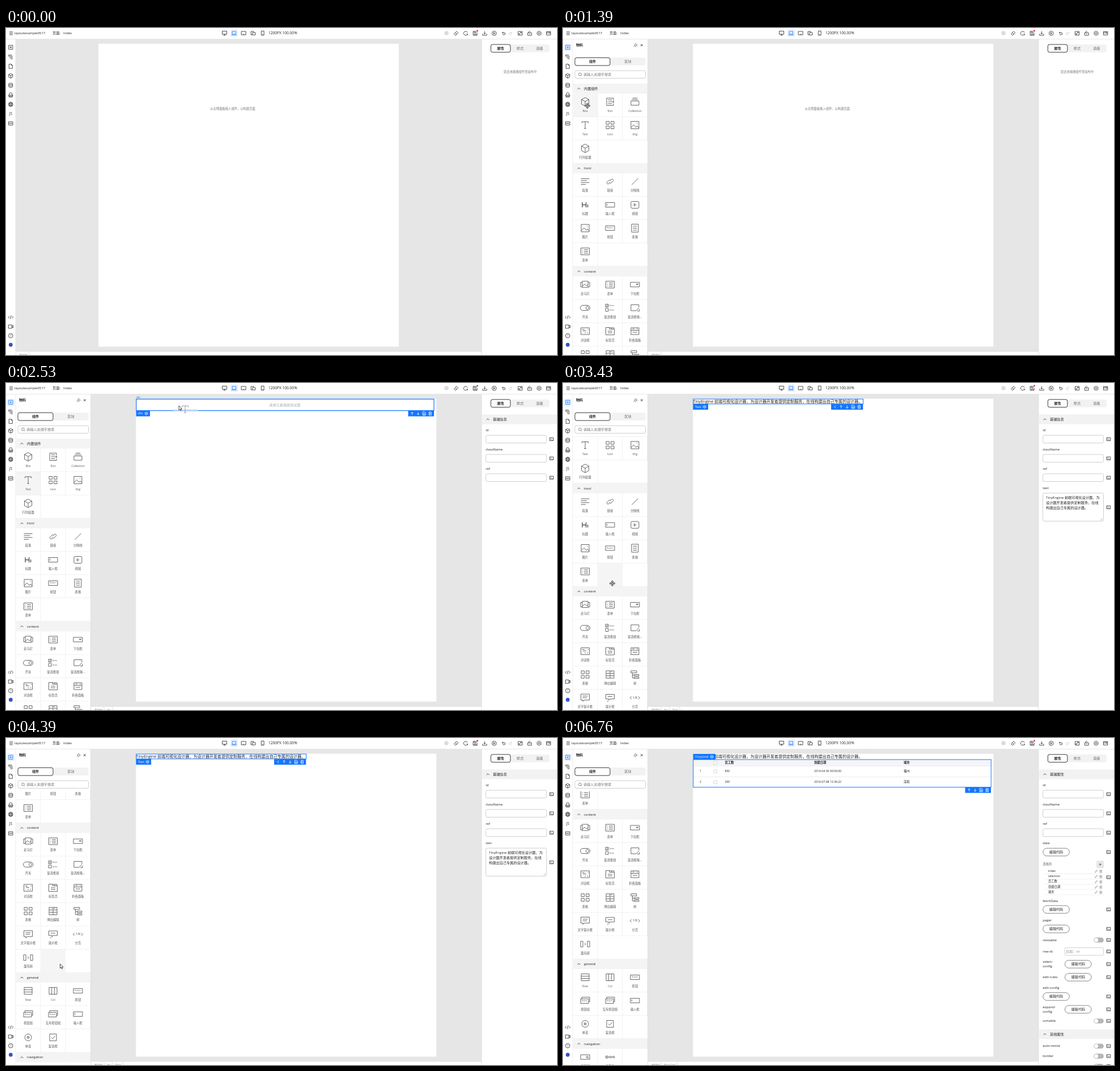
Write an HTML page with a canvas that moves like this. It is 972x576 px and loops after 6.79 s.

```html
<!DOCTYPE html>
<html lang="zh-CN">
<head>
<meta charset="utf-8">
<title>Page designer</title>
<style>
html, body { margin: 0; width: 100%; height: 100%; overflow: hidden; background: #fff; }
canvas { display: block; width: 972px; height: 576px; }
</style>
</head>
<body>
<canvas id="stage"></canvas>
<script>
const LOOP = 6790;
const BLUE = '#1476ff', INK = '#222', GREY = '#666';
const FONT = '"Open Sans","Noto Sans CJK SC","Noto Sans CJK",sans-serif';
const cv = document.getElementById('stage'), c = cv.getContext('2d');
const dpr = window.devicePixelRatio || 1;
cv.width = 972 * dpr;
cv.height = 576 * dpr;

// Icon outlines, centred on 0,0
const ICON = {
  box: 'M0-7.5L6.5-4V4L0 7.5L-6.5 4V-4ZM-6.5-4L0-.5L6.5-4M0-.5V7.5',
  slot: 'M6-2.5V-6.5H-6V6.5H6V3M-3.5-3.5H3.5M-3.5 0H7M-3.5 3.5H3.5M5-2L7 0L5 2',
  stack: 'M-7-1.5H7V6H-7ZM-5.5-4H5.5M-4-6.5H4',
  text: 'M-5.5-3.5V-6H5.5V-3.5M0-6V6M-2 6H2',
  four: 'M-7-6.5h5.5v5h-5.5zM1.5-6.5h5.5v5h-5.5zM-7 1.5h5.5v5h-5.5zM1.5 1.5h5.5v5h-5.5z',
  img: 'M-7-6.5H7V6.5H-7ZM-7 4.5L-2-.5L2 4L4 1.5L7 5M3-3.5h1.2',
  para: 'M-7.5-5H7.5M-7.5-1.7H3M-7.5 1.7H7.5M-7.5 5H1',
  link: 'M-1 2.2L-3.2 4.6A2.6 2.6 0 0 1-5.4 1L-2-2.2A2.6 2.6 0 0 1 1.6-1.8M1-2.2L3.2-4.6A2.6 2.6 0 0 1 5.4-1L2 2.2A2.6 2.6 0 0 1-1.6 1.8',
  line: 'M-5.5 5.5L5.5-5.5',
  head: 'M-5-4.5V4.5M1.5-4.5V4.5M-5 0H1.5M4.5 4.5V.5L3.5 1',
  input: 'M-8-4H8V4H-8ZM-5.5-2V1.5',
  video: 'M-5-6H5Q7-6 7-4V4Q7 6 5 6H-5Q-7 6-7 4V-4Q-7-6-5-6ZM-1.5-2.2L2 0L-1.5 2.2Z',
  btn: 'M-8-4H8V4H-8Z',
  doc: 'M-6-7H6V7H-6ZM-3.5-3.5H3.5M-3.5 0H3.5M-3.5 3.5H3.5',
  list: 'M-7.5-6H7.5V6H-7.5ZM-5-3H-4M-2-3H5M-5 0H-4M-2 0H5M-5 3H-4M-2 3H5',
  slide: 'M-5-6H5V5H-5ZM-5-4H-8V4H-5M5-4H8V4H5M-5 3L-1-1L2 2L5 0',
  select: 'M-8-4H8V4H-8ZM2-1L4 1L6-1Z',
  toggle: 'M-4-4.5H4A4.5 4.5 0 0 1 4 4.5H-4A4.5 4.5 0 0 1-4-4.5ZM1.5 0A2.3 2.3 0 1 0 6 0A2.3 2.3 0 1 0 1.5 0',
  checks: 'M-8-6.5h5v5h-5zM-8 1h5v5h-5zM-7-4L-5.7-2.8L-4-5.5',
  edit: 'M7-1V-5.5H-7V5H2M2 5L7 0M4 5.5H8V2',
  dialog: 'M-7.5-6H7.5V6H-7.5ZM-5.5-3H-1M4.5-3H6M-4-.5H2M-1 3H1M3 3H5',
  tabs: 'M-7.5-6.5H-1V-3.5H7.5V6.5H-7.5ZM-1-6H3V-3.5M3-6H7V-3.5M-4 0H4M-4 3H4',
  fold: 'M-7-6H7V6H-7ZM-7-1.5H7M-4.5-4H-1M3-4H5M-4 2H4',
  popup: 'M-7-6.5H7V6.5H-7ZM-7-2H7M-7 2.2H7M0-2V6.5M-2-4L3-5',
  tree: 'M-7-6.5H3V-3H-7ZM-1 0H7V2.5H-1ZM-1 4.5H7V7H-1ZM-4.5-3V6H-1M-4.5 1H-1',
  tip: 'M-7.5-6.5H7.5V4H-2L-4 6.5V4H-7.5ZM-4.5-3H4.5M-4.5 0H3',
  pop: 'M-7.5-6H7.5V2H0L-2 4.5V2H-7.5ZM-4-2H4M-5 6H-3',
  pager: 'M-6-2.5L-8.5 0L-6 2.5M6-2.5L8.5 0L6 2.5',
  crumb: 'M-8-5H-4V5H-8ZM4-5H8V5H4ZM-1-2L1 0L-1 2',
  row: 'M-7-6H7V6H-7ZM-7-2H7M-7 2H7',
  col: 'M-7-6H7V6H-7ZM-2.3-6V6M2.3-6V6',
  btns: 'M-6-3V-6H8V2H6M-8-3H6V5H-8Z',
  radio: 'M-6 0A6 6 0 1 0 6 0A6 6 0 1 0-6 0M-2 0A2 2 0 1 0 2 0A2 2 0 1 0-2 0M-1 0H1',
  check: 'M-6-6H6V6H-6ZM-3 0L-.7 2.3L3.5-2.5',
  find: 'M-8-4H8V4H-8ZM2 0A1.6 1.6 0 1 0 5.2 0A1.6 1.6 0 1 0 2 0M4.8 1.2L6 2.4',
  steps: 'M-8 0A2.2 2.2 0 1 0-3.6 0A2.2 2.2 0 1 0-8 0M-3.6 0H-1M-1 0A1.6 1.6 0 1 0 2.2 0A1.6 1.6 0 1 0-1 0M2.2 0H4.8M4.8 0A1.6 1.6 0 1 0 8 0A1.6 1.6 0 1 0 4.8 0M-5.8-1V1',
  // small interface icons
  menu: 'M-3-2.5H3M-3 0H3M-3 2.5H3',
  desk: 'M-4-3.5H4V2H-4ZM0 2V3.7M-2 3.7H2',
  laptop: 'M-3.2-3H3.2V2H-3.2ZM-4.5 3.2H4.5',
  pad: 'M-4-3H4V3H-4ZM-1 2H1',
  fold2: 'M-3.7 3V-3H1V-1.5M-1-1H4V3.2H-1ZM-3.7 3H-1',
  phone: 'M-2.4-3.7H2.4V3.7H-2.4ZM-.6 2.5H.6',
  erase: 'M-3.6 1L1-3.5L3.7-.8L-.8 3.5H-1.5ZM-1.5-1L1.3 1.7',
  turn: 'M3.3-1.2A3.5 3.5 0 1 0 2.8 2.2M3.6 3.4V1.4H1.6',
  save: 'M2-3.4H-3.5V3.5H3.5V-1M-1.6-3.4V-.8H1.6V-3M-1.6 3.5V1.5H1.6V3.5',
  down: 'M0-3.5V1.5M-2-.5L0 1.5L2-.5M-3.7 1V3.5H3.7V1',
  play: 'M-3.8 0A3.8 3.8 0 1 0 3.8 0A3.8 3.8 0 1 0-3.8 0M-1-1.6L1.6 0L-1 1.6Z',
  undo: 'M-1-2.6L-2.7-1L-1 .6M-2.7-1H1A1.7 1.7 0 0 1 1 2.5H-2',
  redo: 'M1-2.6L2.7-1L1 .6M2.7-1H-1A1.7 1.7 0 0 0-1 2.5H2',
  media: 'M-3.6-3.2H3.6V3.2H-3.6ZM-2 1.7L2-1.7M.5-1.7H2V-.2M-2 .2V1.7H-.5',
  lock: 'M-3.4-.8H3.4V3.6H-3.4ZM-1.7-.8V-2A1.7 1.7 0 0 1 1.5-2.7M0 .8V2',
  gear: 'M0-3.8L3.4-1.9V1.9L0 3.8L-3.4 1.9V-1.9ZM-1.3 0A1.3 1.3 0 1 0 1.3 0A1.3 1.3 0 1 0-1.3 0',
  plate: 'M-3.7-3H3.7V3H-3.7Z',
  add: 'M-3.6-3.6H3.6V3.6H-3.6ZM-2 0H2M0-2V2',
  outline: 'M-3.5-3.2H2M-2-1H3.5M-2 1.2H3.5M-.5 3.4H3.5M-3.5-3.2V-1H-2',
  page: 'M-3-3.8H1L3-1.8V3.8H-3ZM1-3.8V-1.8H3',
  data: 'M-3.4-2.5A3.4 1.3 0 0 1 3.4-2.5V2.5A3.4 1.3 0 0 1-3.4 2.5ZM-3.4-2.5A3.4 1.3 0 0 0 3.4-2.5M-3.4 0A3.4 1.3 0 0 0 3.4 0',
  stamp: 'M-2.5.5V-2A2.5 1.8 0 0 1 2.5-2V.5M-3.7.5H3.7V2.4H-3.7ZM-3.5 3.8H3.5',
  globe: 'M-3.8 0A3.8 3.8 0 1 0 3.8 0A3.8 3.8 0 1 0-3.8 0M-1.7 0A1.7 3.8 0 1 0 1.7 0A1.7 3.8 0 1 0-1.7 0M-3.5-1.3H3.5M-3.5 1.3H3.5',
  code: 'M-2.2-2.2L-4.4 0L-2.2 2.2M2.2-2.2L4.4 0L2.2 2.2M.8-3L-.8 3',
  cam: 'M-4-3H2V3H-4ZM2-.8L4.3-2.2V2.2L2 .8',
  ring: 'M-3.8 0A3.8 3.8 0 1 0 3.8 0A3.8 3.8 0 1 0-3.8 0',
  pin: 'M0-3L3 0L1.5.3L.2 2.5L-2.5-.2L-.3-1.5ZM-1.2 1.2L-3 3',
  close: 'M-1.8-1.8L1.8 1.8M1.8-1.8L-1.8 1.8',
  lens: 'M-2.8-.4A2.4 2.4 0 1 0 2-.4A2.4 2.4 0 1 0-2.8-.4M1.4 1.4L3 3',
  up: 'M0-2.5V2.5M-2-.5L0-2.5L2-.5',
  dn: 'M0-2.5V2.5M-2 .5L0 2.5L2 .5',
  back: 'M1.2-2.4L-1.2 0L1.2 2.4',
  copy: 'M-2.5-3H1L2.5-1.5V3H-2.5ZM-1 2V0H1V2',
  bin: 'M-2.8-1.8H2.8M-2-1.8V2.8H2V-1.8M-1-3H1M-.6-.3V1.5M.6-.3V1.5',
  pen: 'M-2 2L-1.6.6L1.5-2.4L2.4-1.5L-.6 1.6Z',
  chev: 'M-2.4 1.2L0-1.2L2.4 1.2',
  plus: 'M-2 0H2M0-2V2',
  bind: 'M-3.3-2.6H3.3V2.6H-3.3ZM-1.8-1L-.6 0L-1.8 1M.2 1.2H1.8'
};
const PATH = {};
for (const k in ICON) PATH[k] = new Path2D(ICON[k]);

const GROUPS = [
  ['内置组件', 'box Box|slot Slot|stack Collection|text Text|four Icon|img Img|box 行列容器'],
  ['html', 'para 段落|link 链接|line 分隔线|head 标题|input 输入框|video 视频|img 图片|btn 按钮|doc 表格|list 表单'],
  ['content', 'slide 走马灯|list 表单|select 下拉框|toggle 开关|checks 复选框组|edit 复选框拖...|dialog 对话框|tabs 标签页|fold 折叠面板|four 表格|popup 弹出编辑|tree 树|tip 文字提示框|pop 提示框|pager 分页|crumb 面包屑'],
  ['general', 'row Row|col Col|btn 按钮|btns 按钮组|btns 互斥按钮组|input 输入框|radio 单选|check 复选框'],
  ['navigation', 'find 搜索框|steps 步骤条']
].map(([title, items]) => [title, items.split('|').map(s => s.split(' '))]);

// [time, x, y] of the pointer
const POINTER = [
  [100, 640, 135], [400, 300, 108], [760, 9, 36], [1090, 9, 36], [1390, 43, 137], [1510, 43, 137],
  [1750, 470, 108], [1780, 455, 110], [2080, 41, 173], [2170, 41, 173], [2440, 275, 58], [2530, 305, 40],
  [2710, 305, 40], [2770, 316, 40], [2980, 316, 40], [3340, 87, 353], [3670, 87, 353], [3970, 95.5, 398],
  [4390, 95.5, 398], [4570, 95.5, 385], [5440, 95.5, 385], [5470, 82, 323], [5710, 42, 276],
  [5860, 42, 276], [6160, 340, 122], [6400, 340, 122], [6700, 600, -12]
];
const SCROLL = [[3370, 0], [3430, 61], [3640, 170], [3970, 262], [4150, 262], [4180, 270], [4390, 270], [4570, 294]];
// start, drop, icon, grab point
const DRAGS = [[1510, 1750, 'box', 43, 137], [2170, 2980, 'text', 41, 173], [5860, 6400, 'four', 42, 276]];

function along(track, t) {
  if (t <= track[0][0]) return track[0].slice(1);
  for (let i = 1; i < track.length; i++) {
    const a = track[i - 1], b = track[i];
    if (t < b[0]) {
      const k = (t - a[0]) / (b[0] - a[0]);
      return a.slice(1).map((v, j) => v + (b[j + 1] - v) * k);
    }
  }
  return track[track.length - 1].slice(1);
}

function fill(x, y, w, h, color) {
  c.fillStyle = color;
  c.fillRect(x, y, w, h);
}
function round(x, y, w, h, r, bg, line, lw = .8) {
  c.beginPath();
  c.roundRect(x, y, w, h, r);
  if (bg) { c.fillStyle = bg; c.fill(); }
  if (line) { c.strokeStyle = line; c.lineWidth = lw; c.stroke(); }
}
function text(s, x, y, size = 6.18, color = INK, align = 'left', weight = 400) {
  if (/^[\x00-\x7f]+$/.test(s)) size *= .96;
  c.font = `${weight} ${size}px ${FONT}`;
  c.fillStyle = color;
  c.textAlign = align;
  c.textBaseline = 'middle';
  c.fillText(s, x, y + .2);
}
function icon(name, x, y, color = INK, lw = .8, k = 1) {
  c.save();
  c.translate(x, y);
  c.scale(k, k);
  c.strokeStyle = color;
  c.lineWidth = lw / k;
  c.stroke(PATH[name]);
  c.restore();
}

function header() {
  fill(0, 0, 972, 19.5, '#fff');
  fill(0, 19.2, 972, .6, '#dedede');
  icon('menu', 9, 9.3);
  text('layoutexample0517', 15, 9);
  text('页面:', 82, 9);
  text('Index', 101, 9);
  round(396, 2.5, 13, 13, 2, '#e6effc');
  ['desk', 'laptop', 'pad', 'fold2', 'phone'].forEach((n, i) =>
    icon(n, 385.5 + i * 16.8, 9, i === 1 ? BLUE : INK));
  text('1200PX 100.00%', 463, 9, 6.9);
  c.beginPath();
  c.arc(777, 9, 3.8, 0, 7);
  c.fillStyle = '#dcdcdc';
  c.fill();
  ['erase', 'turn', 'save', 'down', 'play', 'undo'].forEach((n, i) => icon(n, 794 + i * 16.8, 9.3));
  icon('redo', 890, 9.3, '#ccc');
  ['media', 'lock', 'gear', 'plate'].forEach((n, i) => icon(n, 907 + i * 16.7, 9.3));
  text('CN', 957, 9.2, 4.2, INK, 'center', 700);
  c.beginPath();
  c.arc(831.5, 5, 1.4, 0, 7);
  c.fillStyle = '#e8202a';
  c.fill();
}

function rail(open) {
  fill(0, 20, 17, 556, '#fff');
  fill(16.7, 20, .6, 556, '#dcdcdc');
  if (open) round(2, 28, 13, 12.5, 2, '#e6effc');
  ['add', 'outline', 'page', 'box', 'data', 'stamp', 'globe'].forEach((n, i) =>
    icon(n, 8.3, 34 + i * 16.75, open && !i ? BLUE : INK, .8, n === 'box' ? .54 : 1));
  text('JS', 8.3, 151.5, 6.6, INK, 'center');
  icon('plate', 8.3, 168);
  text('var', 8.3, 167.5, 3.6, INK, 'center', 700);
  icon('code', 8.3, 509.5);
  icon('cam', 8.3, 526);
  icon('ring', 8.3, 542);
  text('?', 8.3, 542, 5.5, INK, 'center');
  c.beginPath();
  c.arc(8.3, 558, 3.4, 0, 7);
  c.fillStyle = '#3353c8';
  c.fill();
}

function cell(name, label, x, y) {
  icon(name, x, y + 14.5, '#555', name === 'head' ? 1.4 : .9);
  if (name === 'btn') text('Button', x, y + 14.3, 3.7, '#555', 'center');
  if (name === 'btns') text('Button', x - 1, y + 15.3, 3.4, '#555', 'center');
  if (name === 'pager') text('1/8', x, y + 14.3, 5.6, '#444', 'center');
  if (name === 'checks') [10.5, 18].forEach(d => text('Item', x - 1, y + d, 4.2, '#555'));
  text(label, x, y + 30.5, 5.3, '#555', 'center');
}

function library(scroll, hx, hy) {
  fill(17.3, 20, 132.4, 556, '#fff');
  text('物料', 23, 30.5, 6.1, INK, 'left', 700);
  icon('pin', 128, 30.3, '#444', .7);
  icon('close', 138.8, 30.3, INK, .9);
  round(21, 52.3, 124.5, 13.8, 3, '#f2f2f2');
  round(21, 52.3, 62, 13.8, 3, '#fff', '#222', .9);
  text('组件', 52, 59.2, 6.1, INK, 'center', 700);
  text('区块', 114.5, 59.2, 6.1, GREY, 'center');
  round(21, 75.2, 124.5, 13.3, 2.5, '#fff', '#bbb', .7);
  icon('lens', 30.3, 82, '#555', .7);
  text('请输入关键字搜索', 36, 82, 6.18, '#777');
  c.save();
  c.beginPath();
  c.rect(17.3, 94, 132, 482);
  c.clip();
  let y = 98 - scroll;
  for (const [title, items] of GROUPS) {
    fill(17.3, y, 132, 17.5, '#f4f4f4');
    icon('chev', 28, y + 8.7, INK, .8);
    text(title, 37, y + 8.8);
    y += 17.5;
    const rows = Math.ceil(items.length / 3);
    for (let i = 0; i < rows * 3; i++) {
      const x = 17.3 + i % 3 * 43.9, top = y + Math.floor(i / 3) * 41;
      if (hy > 94 && hx >= x && hx < x + 43.9 && hy >= top && hy < top + 41) fill(x, top, 43.9, 41, '#f5f5f5');
      if (items[i]) {
        fill(x + 43.4, top, .6, 41, '#e6e6e6');
        cell(...items[i], x + 21.8, top);
      }
    }
    for (let r = 1; r <= rows; r++) fill(17.3, y + r * 41 - .6, 132, .6, '#e9e9e9');
    y += rows * 41;
  }
  c.restore();
  fill(149.2, 20, .7, 556, '#d9d9d9');
}

function tag(name, x, y, w) {
  fill(x, y, w, 10, BLUE);
  text(name, x + 3.5, y + 4.9, 6.18, '#fff');
  icon('gear', x + w - 6.5, y + 5, '#fff', .7, .7);
}
function tools(x, y, names) {
  fill(x, y, names.length * 10.6 + 3.2, 10, BLUE);
  names.forEach((n, i) => icon(n, x + 7 + i * 10.6, y + 5, '#fff', .8));
}
function frame(x, y, w, h, lw = 1) {
  c.strokeStyle = BLUE;
  c.lineWidth = lw;
  c.strokeRect(x, y, w, h);
}

const SLOGAN = 'TinyEngine 前端可视化设计器，为设计器开发者提供定制服务，在线构建出自己专属的设计器。';
const ACTIONS = ['up', 'dn', 'copy', 'bin'];

function grid() {
  fill(230, 38, 525, 49, '#fff');
  fill(230, 38, 525, 11, '#f3f5f8');
  [49, 68].forEach(y => fill(230, y, 525, .6, '#dfe1e6'));
  const cols = [285.5, 443, 601];
  [['', '员工数', '创建日期', '城市'], ['1', '800', '2014-04-30 00:56:00', '福州'], ['2', '300', '2016-07-08 12:36:22', '深圳']]
    .forEach(([n, ...vals], r) => {
      const y = [43.5, 58.7, 77.7][r];
      text(n, 242.5, y, 5.3, INK, 'center');
      round(266, y - 2.6, 5.6, 5.6, .8, '#fff', '#bbb', .6);
      vals.forEach((v, i) => text(v, cols[i], y, 5.3, INK, 'left', r ? 400 : 600));
    });
  frame(229.7, 38, 525.5, 48.7);
  tag('TinyGrid', 229.5, 28, 39.5);
  tools(709.4, 86.7, ACTIONS);
}

function page(t, open) {
  const x = open ? 229.3 : 163;
  fill(17, 20, 822, 556, '#e6e6e6');
  fill(x, 27.7, 530, 533.5, '#fff');
  if (t < 1750) text('从左侧面板拖入组件，以构建页面', x + 197 + (open ? 66 - 66 : 0) + 66.2 - 0 - 40 + .3 - 26.2 + 66 - 66, 142, 5.3, '#777', 'left');
  else if (t < 2980) {
    text('请将元素拖放到这里', 492, 38.7, 6.18, '#a5aab2', 'center');
    frame(229.8, 28.4, 525.2, 20.2, 1.2);
    tag('div', 229.5, 48.7, 24.5);
    tools(709.4, 48.7, ACTIONS);
    if (t >= 2470) text('div', 230, 25.7, 5.3, BLUE);
  } else {
    text(SLOGAN, 229.3, 32.8, 7.07);
    if (t < 6400) {
      frame(229.7, 28.2, 299.8, 8.7);
      tag('Text', 229.3, 37, 26.8);
      tools(473, 37, ['back', ...ACTIONS]);
    } else grid();
  }
  fill(17, 569.7, 822, 6.3, '#fff');
  fill(17, 569.5, 822, .7, '#d6d6d6');
  const trail = ['BODY'];
  if (t >= 6400) trail.push('TinyGrid');
  else if (t >= 1750) trail.push('div');
  if (t >= 2980 && t < 6400) trail.push('Text');
  let bx = open ? 156.5 : 24;
  for (const s of trail) {
    text(s, bx, 576, 5.3, '#777');
    bx += c.measureText(s).width;
    c.beginPath();
    c.moveTo(bx + 1.5, 570);
    c.lineTo(bx + 4.5, 576);
    c.strokeStyle = '#ccc';
    c.lineWidth = .6;
    c.stroke();
    bx += 8;
  }
}

const bind = y => icon('bind', 962.3, y, INK, .8);
function field(label, y) {
  text(label, 846.3, y);
  round(846.5, y + 8.6, 107, 13.6, 2.5, '#fff', '#bbb', .7);
  bind(y + 15.5);
}
function codeBtn(x, y) {
  round(x - 23.3, y - 6.8, 46.6, 13.6, 6.8, '#fff', '#555', .7);
  text('编辑代码', x, y, 6.1, INK, 'center');
  bind(y);
}
function flip(label, y) {
  text(label, 846.3, y);
  round(936.3, y - 4.2, 17.5, 8.6, 4.3, '#b5b5b5');
  c.beginPath();
  c.arc(940.7, y + .1, 3.4, 0, 7);
  c.fillStyle = '#fff';
  c.fill();
  bind(y);
}
function section(title, y) {
  fill(839, y - 8.5, 133, 17, '#f2f2f2');
  icon('chev', 850, y, INK, .8);
  text(title, 859, y, 6.18, INK, 'left', 500);
}
function gridProps() {
  text('data', 846.3, 185.2);
  codeBtn(870, 201);
  text('表格列', 846.5, 222.5, 5.3, GREY);
  round(941.2, 216.3, 13, 13, 1.5, '#e6e6e6');
  icon('plus', 947.7, 222.8, '#444');
  c.save();
  c.setLineDash([1, 1]);
  c.strokeStyle = '#ccc';
  c.lineWidth = .6;
  ['index', 'selection', '员工数', '创建日期', '城市'].forEach((s, i) => {
    const y = 234.6 + i * 9.25;
    c.beginPath();
    c.moveTo(850, y + 4.5);
    c.lineTo(953, y + 4.5);
    c.stroke();
    text(s, 856, y - .2, 5.3);
  });
  c.restore();
  for (let i = 0; i < 5; i++) {
    icon('pen', 940.5, 234.8 + i * 9.25, '#777', .6);
    icon('bin', 948.7, 234.8 + i * 9.25, '#777', .6, .8);
  }
  bind(245.3);
  text('fetchData', 846.3, 286.8);
  codeBtn(870, 302);
  text('pager', 846.3, 320.8);
  codeBtn(870, 336.3);
  flip('resizable', 355.8);
  text('row-id', 846.3, 375.8);
  round(885.3, 369.3, 68.2, 13.5, 2.5, '#fff', '#bbb', .7);
  text('比如：id', 887.5, 376, 6.1, '#888');
  bind(376);
  [['select-', 398.4], ['expand-', 478]].forEach(([s, y]) => {
    text(s, 846.3, y - 4.2);
    text('config', 846.3, y + 4);
    codeBtn(908.7, y);
  });
  text('edit-rules', 846.3, 421);
  codeBtn(908.7, 421.3);
  text('edit-config', 846.3, 439.8);
  codeBtn(870, 455.4);
  flip('sortable', 498.4);
  section('其他属性', 521.7);
  flip('auto-resize', 542.6);
  flip('border', 560.3);
  flip('show-header', 578.2);
}

function props(t) {
  fill(839, 20, 133, 556, '#fff');
  fill(838.6, 20, .7, 556, '#d9d9d9');
  round(855.3, 29, 103.5, 13.7, 3, '#f2f2f2');
  round(855.3, 29, 34.5, 13.7, 3, '#fff', '#222', .9);
  text('属性', 872.5, 35.8, 6.18, INK, 'center', 700);
  text('样式', 907, 35.8, 6.18, GREY, 'center');
  text('高级', 941.3, 35.8, 6.18, GREY, 'center');
  if (t < 1750) return text('您还未拖拽组件至画布中', 907, 77, 5.3, '#777', 'center');
  section(t < 6400 ? '基础信息' : '基础属性', 64);
  field('id', 83.5);
  field('className', 117.3);
  field('ref', 151.3);
  if (t >= 6400) gridProps();
  else if (t >= 2980) {
    text('text', 846.3, 185.2);
    round(846.5, 194, 107, 49.3, 2.5, '#fff', '#bbb', .7);
    [[0, 20], [20, 35], [35]].forEach((r, i) => text(SLOGAN.slice(...r.map(n => n && n + 1)), 852, 202 + i * 9.3));
    bind(219);
    c.beginPath();
    c.moveTo(948, 242); c.lineTo(952, 238);
    c.moveTo(950.2, 242); c.lineTo(952, 240.2);
    c.strokeStyle = '#888';
    c.lineWidth = .5;
    c.stroke();
  }
}

const ARROW = new Path2D('M0 0V7.6L1.8 6L3 8.8L4.3 8.2L3.1 5.5H5.4Z');
const CROSS = new Path2D('M0-5L1.8-3H.7V-.7H3V-1.8L5 0L3 1.8V.7H.7V3H1.8L0 5L-1.8 3H-.7V.7H-3V1.8L-5 0L-3-1.8V-.7H-.7V-3H-1.8Z');
function pointer(shape, x, y) {
  c.save();
  c.translate(x, y);
  c.fillStyle = '#fff';
  c.strokeStyle = '#222';
  c.lineWidth = .8;
  c.fill(shape);
  c.stroke(shape);
  c.restore();
}

function draw(t) {
  c.setTransform(dpr, 0, 0, dpr, 0, 0);
  const open = t >= 790;
  const [x, y] = along(POINTER, t), [scroll] = along(SCROLL, t);
  const drag = DRAGS.find(d => t >= d[0] && t < d[1]);
  page(t, open);
  header();
  rail(open);
  if (open) library(scroll, ...(drag ? drag.slice(3) : [x, y]));
  props(t);
  if (t < 100 || t >= 6700) return;
  if (drag) {
    if (drag[2] === 'text' && t >= 2470) fill(x - 10, 46.8, 44, 3, '#b9d6fb');
    c.globalAlpha = .7;
    icon(drag[2], x + 11, y + 6.3, '#667', .9);
    c.globalAlpha = 1;
  }
  const inCells = open && !drag && x > 18 && x < 149 && y > 94 && !(t > 3970 && t < 5470);
  pointer(inCells ? CROSS : ARROW, x, y);
}

const start = performance.now();
function tick(now) {
  draw(Math.max(0, now - start) % LOOP);
  requestAnimationFrame(tick);
}
draw(0);
requestAnimationFrame(tick);
</script>
</body>
</html>
```
